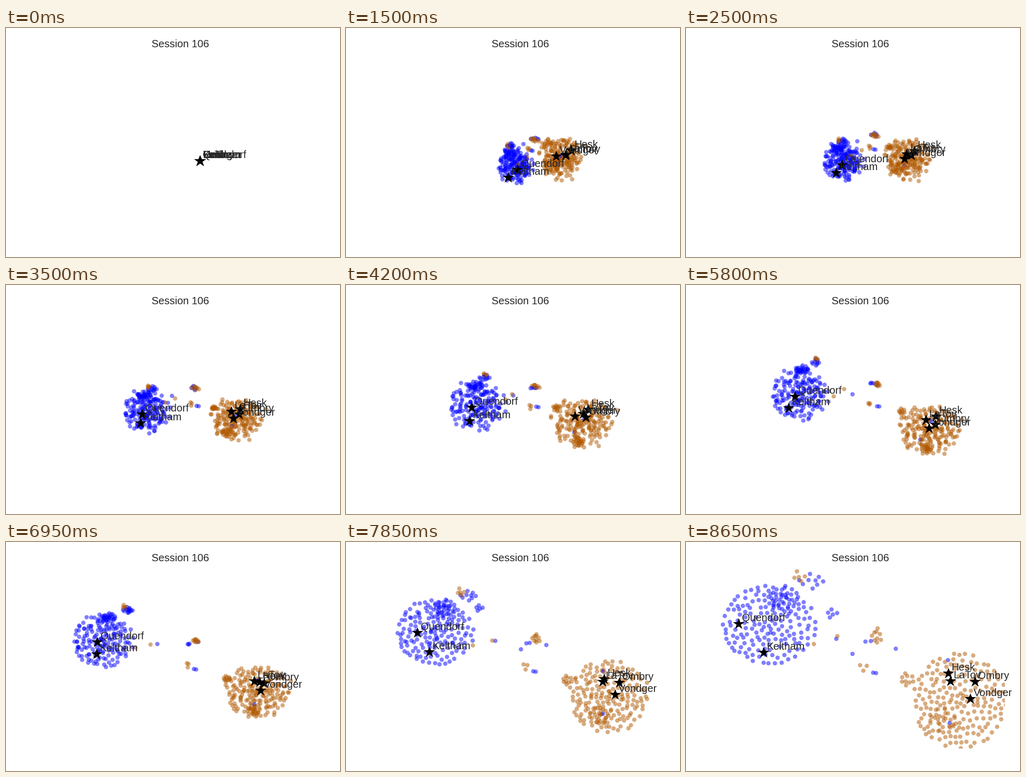
A matplotlib script for the animation above (8.7 s loop, 640 px wide and 440 px high).

```python
import matplotlib.pyplot as plt
import numpy as np
from matplotlib.animation import FuncAnimation

W, H, DPI = 640, 440, 100
FRAMES, STEP = 174, 50
LEFT, RIGHT, TOP, BOTTOM = 57, 611, 44, 397
BLUE, BROWN, INK = "#0000ff", "#b15900", "#262626"
START = np.array([372, 255, 0, 0])
TIMES = np.array([0, 700, 1500, 3500, 4850, 5800, 6950, 8650])

plt.rcParams["font.family"] = "Liberation Sans"
plt.rcParams["font.size"] = 20 * 72 / DPI
rng = np.random.default_rng(106)


def disk(n):
    r, a = np.sqrt(rng.random(n)), rng.random(n) * 2 * np.pi
    return np.column_stack([r * np.cos(a), r * np.sin(a)])


def even_disk(n):
    """Spread n points evenly over the unit disk."""
    if n == 1:
        return np.zeros((1, 2))
    pts = disk(1)
    while len(pts) < n:
        tries = disk(10)
        gaps = np.hypot(*(tries[:, None] - pts).T).min(axis=0)
        pts = np.vstack([pts, tries[gaps.argmax()]])
    return pts


def with_start(keys):
    """Put the common start and the quick burst in front of the keys."""
    keys = np.array(keys, float)
    start = START[:keys.shape[1]]
    return np.vstack([start, start + 0.92 * (keys[0] - start), keys])


def glide(keys, slopes, t):
    """Cubic Hermite curve through the keys."""
    i = min(np.searchsorted(TIMES, t, side="right") - 1, len(TIMES) - 2)
    span = TIMES[i + 1] - TIMES[i]
    s = (t - TIMES[i]) / span
    return ((2 * s**3 - 3 * s**2 + 1) * keys[i]
            + (s**3 - 2 * s**2 + s) * span * slopes[i]
            + (3 * s**2 - 2 * s**3) * keys[i + 1]
            + (s**3 - s**2) * span * slopes[i + 1])


tracks, homes, colors = [], [], []


def add(n, color, *keys):
    """Add a group of n dots; each key is centre x, y and radius x, y."""
    tracks.extend([with_start(keys)] * n)
    homes.append(even_disk(n))
    colors.extend([color] * n)


def single(color, *points):
    add(1, color, *[(x, y, 0, 0) for x, y in points])


# left party
add(165, BLUE, (325, 266, 31, 30), (270, 243, 42, 38), (236, 222, 58, 50),
    (218, 211, 52, 47), (186, 190, 57, 50), (160, 160, 90, 76))
add(24, BLUE, (313, 240, 11, 12), (264, 213, 16, 7), (235, 178, 16, 9),
    (222, 163, 14, 8), (196, 146, 15, 9), (187, 108, 28, 24))
add(9, BLUE, (315, 225, 8, 5), (280, 199, 10, 6), (254, 158, 12, 7),
    (248, 148, 8, 9), (232, 130, 9, 7), (240, 74, 26, 18))
add(5, BLUE, (340, 270, 12, 12), (290, 255, 20, 20), (268, 222, 15, 15),
    (255, 205, 12, 10), (238, 132, 5, 5), (281, 137, 9, 10))
add(5, BROWN, (311, 227, 4, 5), (273, 196, 4, 3), (259, 154, 6, 5),
    (249, 143, 4, 4), (226, 126, 5, 6), (214, 70, 16, 16))

# between the parties
add(9, BROWN, (361, 215, 8, 4), (363, 198, 7, 4), (364, 193, 8, 4),
    (367, 191, 5, 5), (364, 190, 6, 4), (366, 182, 10, 18))
add(2, BLUE, (361, 213, 7, 4), (360, 198, 5, 4), (356, 198, 4, 5),
    (356, 189, 3, 2), (350, 196, 2, 3), (349, 191, 6, 3))
add(3, BROWN, (348, 232, 5, 3), (354, 228, 3, 5), (350, 237, 5, 5),
    (350, 228, 4, 2), (347, 236, 4, 6), (335, 241, 16, 8))
add(2, BLUE, (356, 235, 2, 2), (367, 232, 3, 2), (366, 235, 3, 2),
    (368, 233, 3, 1), (362, 244, 3, 2), (361, 251, 4, 2))
single(BLUE, (340, 223), (318, 213), (323, 212), (319, 210), (290, 196), (288, 186))
single(BROWN, (347, 248), (324, 218), (313, 204), (303, 200), (277, 197), (290, 181))
single(BROWN, (330, 262), (305, 226), (304, 217), (283, 214), (248, 203), (245, 196))
single(BLUE, (363, 211), (359, 194), (355, 199), (355, 188), (350, 197), (319, 215))
single(BLUE, (369, 214), (362, 202), (368, 194), (366, 192), (368, 192), (402, 205))

# right party
add(9, BROWN, (384, 222, 9, 5), (398, 236, 4, 3), (408, 234, 10, 4),
    (413, 243, 6, 6), (422, 263, 6, 6), (423, 264, 13, 13))
add(185, BROWN, (411, 249, 37, 37), (441, 257, 46, 37), (460, 270, 62, 48),
    (466, 278, 56, 45), (481, 287, 60, 48), (524, 305, 90, 92))
add(18, BROWN, (396, 265, 14, 12), (424, 284, 10, 9), (462, 315, 13, 8),
    (462, 314, 12, 8), (475, 324, 14, 10), (492, 345, 28, 26))
single(BLUE, (405, 262), (433, 271), (441, 293), (449, 297), (476, 312), (505, 348))
single(BLUE, (412, 246), (441, 250), (468, 262), (470, 262), (482, 266), (502, 227))

# shuffle so that neither colour always lies on top
order = rng.permutation(len(colors))
dot_keys = np.stack(tracks, axis=1)[:, order]
dot_slopes = np.gradient(dot_keys, TIMES, axis=0)
late = np.vstack(homes)[order]
radius = np.hypot(*late.T)[:, None]
early = late * radius**0.35 + rng.normal(0, 0.13, late.shape) * (radius > 0)
late = late * radius**0.1
phase = rng.random(late.shape) * 2 * np.pi
colors = [colors[i] for i in order]

members = {
    "Quendorf": [(329, 272), (261, 248), (225, 224), (209, 214), (175, 192), (101, 157)],
    "Keltham": [(311, 287), (258, 265), (219, 255), (197, 236), (174, 215), (149, 212)],
    "Hesk": [(432, 235), (449, 238), (476, 242), (479, 252), (486, 269), (503, 252)],
    "LaTov": [(422, 243), (432, 243), (471, 251), (460, 259), (476, 267), (507, 267)],
    "Ombry": [(421, 244), (447, 248), (470, 261), (478, 268), (495, 271), (554, 268)],
    "Vondger": [(403, 246), (436, 256), (444, 252), (466, 275), (488, 285), (545, 301)],
}
star_keys = np.stack([with_start(k) for k in members.values()], axis=1)
star_slopes = np.gradient(star_keys, TIMES, axis=0)

fig = plt.figure(figsize=(W / DPI, H / DPI), dpi=DPI, facecolor="white")
ax = fig.add_axes([LEFT / W, 1 - BOTTOM / H, (RIGHT - LEFT) / W, (BOTTOM - TOP) / H])
ax.set(xlim=(LEFT, RIGHT), ylim=(BOTTOM, TOP))
ax.axis("off")
ax.text((LEFT + RIGHT) / 2, 37, "Session 106", color=INK, ha="center")

dots = ax.scatter(dot_keys[0, :, 0], dot_keys[0, :, 1], s=36, c=colors,
                  alpha=0.5, linewidths=0)
stars, = ax.plot([], [], "*", color="black", ms=23 * 72 / DPI, mew=0)
labels = [ax.text(0, 0, name, color=INK) for name in members]


def draw(frame):
    t = frame * STEP
    place = glide(dot_keys, dot_slopes, t)
    mix = (t / TIMES[-1]) ** 2
    home = early + (late - early) * mix
    home = home + 0.04 * (1 - mix) * np.sin(t / 450 + phase)
    dots.set_offsets(place[:, :2] + place[:, 2:] * home)

    spots = glide(star_keys, star_slopes, t)
    stars.set_data(spots[:, 0], spots[:, 1] + 1)
    for label, (x, y) in zip(labels, spots):
        label.set_position((x + 5.5, y - 5))
    return [dots, stars, *labels]


anim = FuncAnimation(fig, draw, frames=FRAMES, interval=STEP, repeat=True, blit=False)
plt.show()
```
